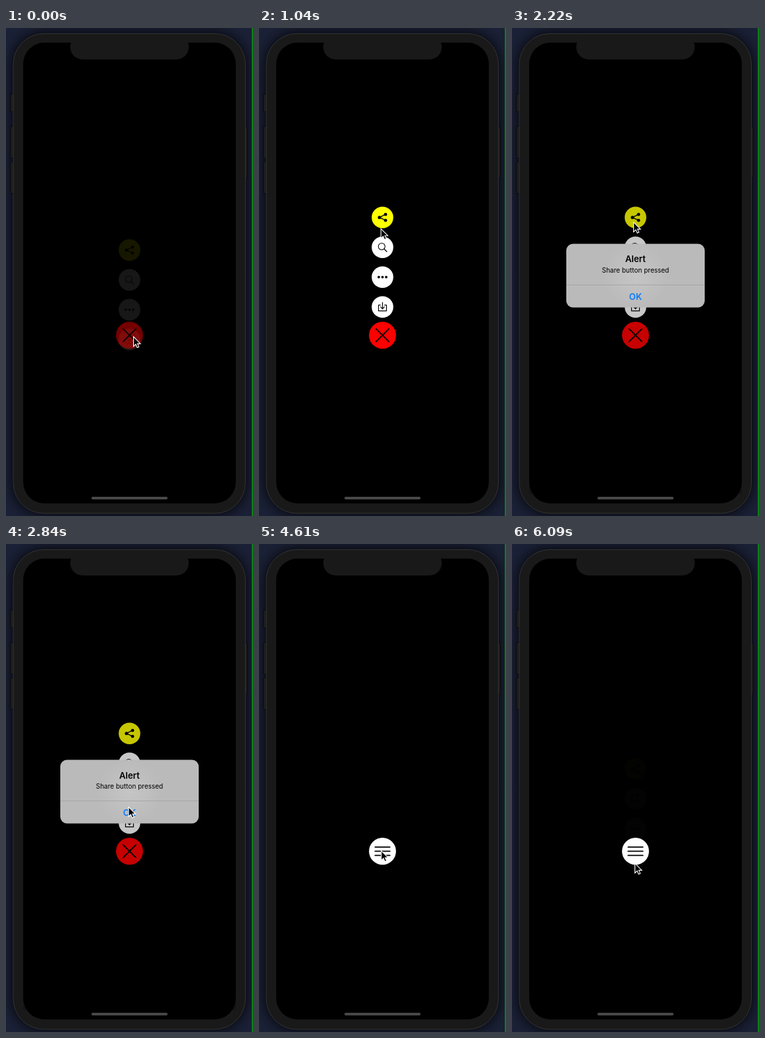
Write an HTML page with a canvas that moves like this. It is 373 px wide and 736 px high and loops after 6600 ms.

```html
<!DOCTYPE html>
<html lang="en">
<head>
<meta charset="utf-8">
<title>Floating menu</title>
<style>
html, body { margin: 0; width: 100%; height: 100%; overflow: hidden; background: #10121f; }
canvas { display: block; width: 373px; height: 736px; }
</style>
</head>
<body>
<canvas id="stage"></canvas>
<script>
const W = 373, H = 736, LOOP = 6600;
const canvas = document.getElementById('stage');
const ctx = canvas.getContext('2d');
const dpr = window.devicePixelRatio || 1;
canvas.width = Math.round(W * dpr);
canvas.height = Math.round(H * dpr);

const CX = 186.5, MAIN_Y = 463.4, SHARE_Y = 285.7, STEP = 45, DROP = 54;
const FONT = 'Inter, Roboto, sans-serif';
const BODY = '#191919';

// A tap dims a button for HOLD, then it fades back over FADE.
const DIM = 0.17, HOLD = 85, FADE = 250;
// Each tap on the main button toggles the list, which moves LAG later.
const MAIN_TAPS = [-103, 3605, 4700, 5855];
const SHARE_TAPS = [1650];
const LAG = 65, SLIDE = 185;
const ALERT_IN = 1710, ALERT_OUT = 2860;

// The pointer glides to each next stop at the given time.
const STOPS = [
  { at: 0, x: 193, y: 466 },
  { at: 560, x: 184, y: 293 },
  { at: 2200, x: 185.5, y: 397 },
  { at: 2920, x: 185, y: 463 },
  { at: 4850, x: 186, y: 482 }
];
const GLIDE = 580;

const clamp = v => Math.max(0, Math.min(1, v));
const mix = (a, b, u) => a + (b - a) * u;
const inOut = u => u < 0.5 ? 2 * u * u : 1 - 2 * (1 - u) * (1 - u);
const ease = (t, start, ms) => inOut(clamp((t - start) / ms));

function tapAlpha(t, taps) {
  const last = taps.filter(up => t >= up - HOLD).pop();
  return last === undefined ? 1 : mix(DIM, 1, ease(t, last, FADE));
}

const isOpen = t => MAIN_TAPS.filter(up => t >= up).length % 2 === 1;

const openness = t => MAIN_TAPS.reduce(
  (p, up, i) => mix(p, i % 2 ? 0 : 1, ease(t, up + LAG, SLIDE)), 0);

const pointerAt = t => STOPS.reduce((p, s) => {
  const u = ease(t, s.at, GLIDE);
  return { x: mix(p.x, s.x, u), y: mix(p.y, s.y, u) };
}, STOPS[0]);

function box(x, y, w, h, r, fill, stroke) {
  ctx.beginPath();
  ctx.roundRect(x, y, w, h, r);
  if (fill) { ctx.fillStyle = fill; ctx.fill(); }
  if (stroke) { ctx.strokeStyle = stroke; ctx.lineWidth = 1; ctx.stroke(); }
}

function disc(x, y, r, fill) {
  ctx.beginPath();
  ctx.arc(x, y, r, 0, Math.PI * 2);
  ctx.fillStyle = fill;
  ctx.fill();
}

function line(width, ...pts) {
  ctx.beginPath();
  for (let i = 0; i < pts.length; i += 2) ctx.lineTo(pts[i], pts[i + 1]);
  ctx.lineWidth = width;
  ctx.strokeStyle = '#000';
  ctx.stroke();
}

const icons = {
  share() {
    disc(-4.6, 0, 2.5, '#000');
    for (const side of [-1, 1]) {
      line(1.4, -4.6, 0, 4.6, 4.5 * side);
      disc(4.6, 4.5 * side, 2.4, '#000');
    }
  },
  search() {
    ctx.beginPath();
    ctx.arc(-1.2, -1.2, 5, 0, Math.PI * 2);
    ctx.lineWidth = 1.1;
    ctx.strokeStyle = '#000';
    ctx.stroke();
    line(1.3, 2.5, 2.5, 6.5, 6.5);
  },
  more() {
    for (const i of [-1, 0, 1]) disc(5.6 * i, 0, 1.9, '#000');
  },
  save() {
    for (const side of [-1, 1]) {
      line(1.2, 3.2 * side, -2.8, 6 * side, -2.8, 6 * side, 6, 0, 6);
      line(1.2, 2.8 * side, 0, 0, 2.8);
    }
    line(1.2, 0, -6.5, 0, 2.6);
  },
  cross() {
    for (const side of [-1, 1]) line(2, -9.5, -9.5 * side, 9.5, 9.5 * side);
  },
  menu() {
    for (const i of [-1, 0, 1]) line(1.8, -11.2, 6.3 * i, 11.2, 6.3 * i);
  }
};

function button(y, r, color, icon, alpha) {
  if (alpha <= 0.004) return;
  ctx.save();
  ctx.translate(CX, y);
  ctx.globalAlpha = alpha;
  disc(0, 0, r, color);
  ctx.globalAlpha = mix(0.75, 1, alpha);
  ctx.lineCap = 'round';
  ctx.lineJoin = 'round';
  icons[icon]();
  ctx.restore();
}

function sideKey(x, y, h) {
  box(x, y, 6, h, 1.5, '#1c1c1c', '#090a0e');
}

function phone() {
  ctx.fillStyle = '#1b2137';
  ctx.fillRect(0, 0, W, H);
  ctx.save();
  ctx.shadowColor = '#000';
  ctx.shadowBlur = 22 * dpr;
  box(11, 8.5, 350.5, 723.5, 46, BODY);
  ctx.restore();
  ctx.fillStyle = '#078a10';
  ctx.fillRect(371.2, 0, 1.8, H);

  sideKey(6.5, 99.5, 27);
  sideKey(6.5, 148.5, 48);
  sideKey(6.5, 201.5, 48);
  sideKey(358.5, 149.5, 77);
  box(11, 8.5, 350.5, 723.5, 46, BODY, '#333');
  box(26, 22, 321, 695, 32, '#000');
  box(97, 10, 179, 37.5, 21, BODY);
  box(129, 707, 115, 4, 2, '#484848');
}

function label(text, y, size, weight, color) {
  ctx.font = `${weight} ${size}px ${FONT}`;
  ctx.fillStyle = color;
  ctx.fillText(text, 0, y);
}

function alertBox(t) {
  const age = t - ALERT_IN;
  const leave = 1 - ease(t, ALERT_OUT, 175);
  if (age < 0 || leave === 0) return;
  const decay = Math.exp(-age / 55);
  const zoom = 1 + 0.2 * decay;

  ctx.save();
  ctx.fillStyle = `rgba(0,0,0,${0.22 * (1 - decay) * leave})`;
  ctx.fillRect(26, 48, 321, 655);

  ctx.translate(CX, 373.5);
  ctx.scale(zoom, zoom);
  ctx.globalAlpha = clamp(age / 95) * leave;
  const glow = ctx.createRadialGradient(0, 0, 0, 0, 0, 50);
  glow.addColorStop(0, '#c5c5c5');
  glow.addColorStop(1, '#bababa');
  box(-104.5, -48, 209, 96, 10, glow);
  ctx.fillStyle = '#a2a2a2';
  ctx.fillRect(-104.5, 13.5, 209, 0.8);
  ctx.textAlign = 'center';
  label('Alert', -20, 13.2, 600, '#000');
  label('Share button pressed', -4.8, 10, 400, '#000');
  label('OK', 36.5, 13.2, 600, '#087aff');
  ctx.restore();
}

function pointer({ x, y }) {
  ctx.save();
  ctx.translate(x - 0.4, y - 0.3);
  ctx.scale(0.93, 0.93);
  ctx.beginPath();
  ctx.moveTo(0, 0);
  ctx.lineTo(0, 15.5);
  ctx.lineTo(3.6, 12.2);
  ctx.lineTo(6, 17.6);
  ctx.lineTo(8.7, 16.4);
  ctx.lineTo(6.4, 11.2);
  ctx.lineTo(11.2, 11.2);
  ctx.closePath();
  ctx.lineWidth = 1.2;
  ctx.fillStyle = '#000';
  ctx.strokeStyle = '#fff';
  ctx.fill();
  ctx.stroke();
  ctx.restore();
}

function draw(t) {
  ctx.setTransform(dpr, 0, 0, dpr, 0, 0);
  phone();

  const p = openness(t);
  ['share', 'search', 'more', 'save'].forEach((icon, i) => {
    const y = SHARE_Y + STEP * i + DROP * (1 - p);
    if (icon === 'share') button(y, 16.3, '#ff0', icon, p * tapAlpha(t, SHARE_TAPS));
    else button(y, 16.3, '#fff', icon, p);
  });

  const open = isOpen(t);
  button(MAIN_Y, 20.4, open ? '#f00' : '#fff', open ? 'cross' : 'menu', tapAlpha(t, MAIN_TAPS));

  alertBox(t);
  pointer(pointerAt(t));
}

const start = performance.now();
function tick() {
  draw((performance.now() - start) % LOOP);
  requestAnimationFrame(tick);
}
tick();
</script>
</body>
</html>
```
